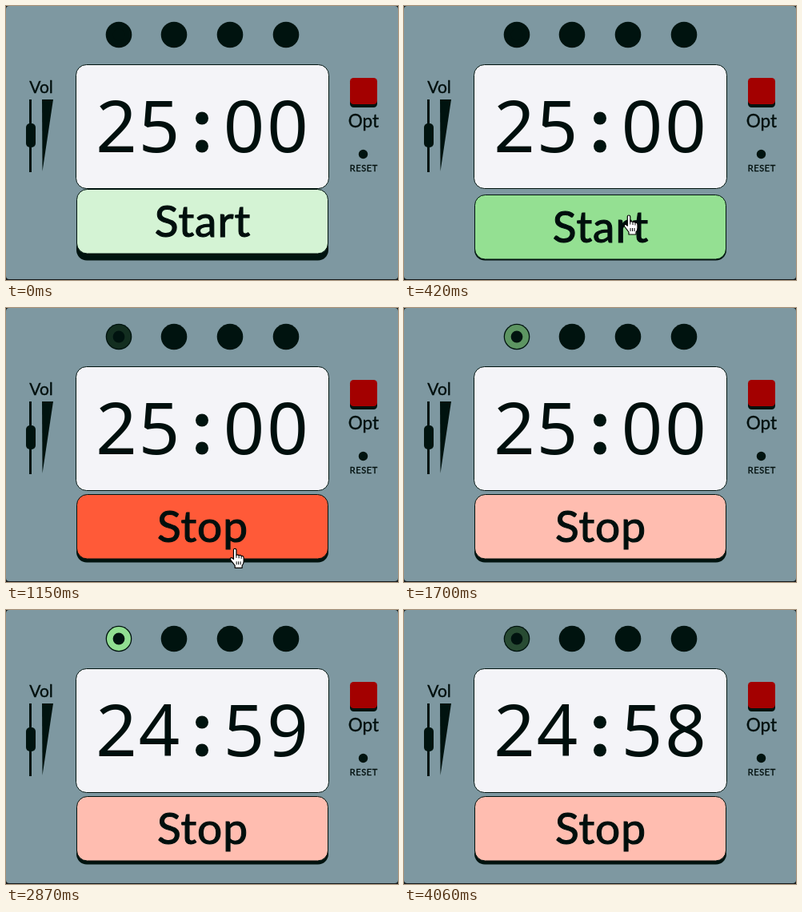
Write an HTML page that moves like this. It is 490x343 px and loops after 4.13 s.

```html
<!DOCTYPE html>
<html lang="en">
<head>
<meta charset="utf-8">
<title>Timer</title>
<style>
  html, body { margin: 0; width: 100%; height: 100%; overflow: hidden; background: #15191a; }
  svg { display: block; width: 490px; height: 343px; }
  text {
    font-family: Lato, "Open Sans", sans-serif; text-anchor: middle;
    fill: #000f0d; stroke: #000f0d; stroke-width: .35;
  }
  .digits { font: 90px "Noto Sans", "Open Sans", sans-serif; stroke: none; }
  .label { font-size: 55px; letter-spacing: 1px; stroke-width: 1.1; }
  .dark { fill: #00130f; }
  .edge { stroke: #00130f; stroke-width: 1; }
</style>
</head>
<body>
<svg viewBox="0 0 490 343">
  <rect width="490" height="342" rx="4" fill="#7e98a1"/>

  <g class="dark">
    <circle cx="141" cy="36" r="16.3"/>
    <circle cx="210" cy="36" r="16.3"/>
    <circle cx="280" cy="36" r="16.3"/>
    <circle cx="350" cy="36" r="16.3"/>
  </g>
  <circle id="led" cx="141" cy="36" r="15"/>
  <circle class="dark" cx="141" cy="36" r="7.4"/>

  <text x="44" y="109" font-size="21">Vol</text>
  <g class="dark">
    <rect x="29" y="117" width="3" height="91"/>
    <rect x="25" y="147" width="12" height="30" rx="5"/>
    <path d="M45 117H59L45.5 207Z"/>
  </g>

  <rect class="dark" x="430" y="92" width="34" height="35" rx="4.5"/>
  <rect x="430" y="90" width="34" height="33" rx="4.5" fill="#a30000"/>
  <text x="447" y="152" font-size="22.5">Opt</text>
  <circle class="dark" cx="446.5" cy="185.5" r="5.7"/>
  <text x="447.3" y="207" font-size="11" letter-spacing=".6">RESET</text>

  <rect class="edge" x="87.5" y="73.5" width="316" height="155" rx="13" fill="#f4f4f8"/>
  <text class="digits" id="minutes" x="138 191.5" y="183"></text>
  <circle class="dark" cx="245" cy="140.5" r="8"/>
  <circle class="dark" cx="245" cy="175.5" r="8"/>
  <text class="digits" id="seconds" x="297.5 352" y="183"></text>

  <rect class="dark" x="88" y="240" width="315" height="78.5" rx="13"/>
  <g id="button">
    <rect class="edge" id="face" x="88.5" width="314" height="80.5" rx="13"/>
    <text class="label" id="label" x="246" y="59.3"></text>
  </g>

  <g id="hand">
    <path fill="#fff" stroke="#000" stroke-width="1.2" stroke-linejoin="round"
      d="M-1.7 1.5Q-1.7 0 0 0Q1.8 0 1.8 1.8V8Q3.4 6.9 5 8.4Q6.7 7.5 8 9.2Q11 8.6 11 12V16Q11 19 9 21V24H0V21L-5 14.5Q-6.6 11.8-4.6 11.4Q-3.3 11.2-1.7 13.2Z"/>
    <path fill="none" stroke="#000" d="M1.8 8V11.5M5 8.5V12M8 9.3V12.5M2 16V20M4.5 16V20M7 16V20"/>
  </g>
</svg>
<script>
  const LOOP = 4130, PRESS = 420, CLICK = 880;
  const SECOND = 1110; // one counted second in loop time
  const $ = id => document.getElementById(id);
  const clamp = x => Math.max(0, Math.min(1, x));
  const ramp = (t, a, b) => clamp((t - a) / (b - a));
  const mix = (a, b, k) => `rgb(${a.map((v, i) => Math.round(v + (b[i] - v) * k))})`;

  const DARK = [0, 19, 15], GLOW = [146, 223, 146];
  // Face colours: at rest, under the pointer
  const START = ["#d4f3d4", "#94e092"], STOP = ["#ffbdb0", "#ff5a38"];
  // Pointer stops: time, x, y
  const PATH = [[70, 292, 300], [210, 281, 262], [1020, 281, 262], [1300, 292, 346]];

  function pointer(t) {
    const i = PATH.findIndex(p => p[0] > t);
    if (i < 1) return null;
    const [a, b] = [PATH[i - 1], PATH[i]], k = ramp(t, a[0], b[0]);
    return [a[1] + (b[1] - a[1]) * k, a[2] + (b[2] - a[2]) * k];
  }

  // The CSS "ease" curve, cubic-bezier(.25, .1, .25, 1)
  function ease(x) {
    const curve = (u, p, q) => 3 * u * (1 - u) ** 2 * p + 3 * u * u * (1 - u) * q + u ** 3;
    let low = 0, high = 1;
    for (let i = 0; i < 20; i++) {
      const u = (low + high) / 2;
      if (curve(u, .25, .25) < x) low = u; else high = u;
    }
    return curve(low, .1, 1);
  }

  // The lamp swells for two seconds, then fades for two
  function glow(t) {
    const peak = CLICK + 2 * SECOND;
    return ease(ramp(t, CLICK, peak)) - ease(ramp(t, peak, peak + 2 * SECOND));
  }

  function draw(t) {
    const at = pointer(t);
    const running = t >= CLICK;
    const over = at && at[1] < 318;
    const top = running ? 233.5 : t >= PRESS ? 236.5 : 229.5;
    const left = 1500 - (running ? Math.floor((t - CLICK) / SECOND) : 0);
    const pad = n => String(Math.floor(n)).padStart(2, "0");

    $("led").setAttribute("fill", mix(DARK, GLOW, glow(t)));
    $("minutes").textContent = pad(left / 60);
    $("seconds").textContent = pad(left % 60);
    $("label").textContent = running ? "Stop" : "Start";
    $("face").setAttribute("fill", (running ? STOP : START)[over ? 1 : 0]);
    $("button").setAttribute("transform", `translate(0 ${top})`);

    $("hand").setAttribute("visibility", at ? "visible" : "hidden");
    if (at) $("hand").setAttribute("transform", `translate(${at})`);
  }

  const begin = performance.now();
  function tick() {
    draw((performance.now() - begin) % LOOP);
    requestAnimationFrame(tick);
  }
  tick();
</script>
</body>
</html>
```
